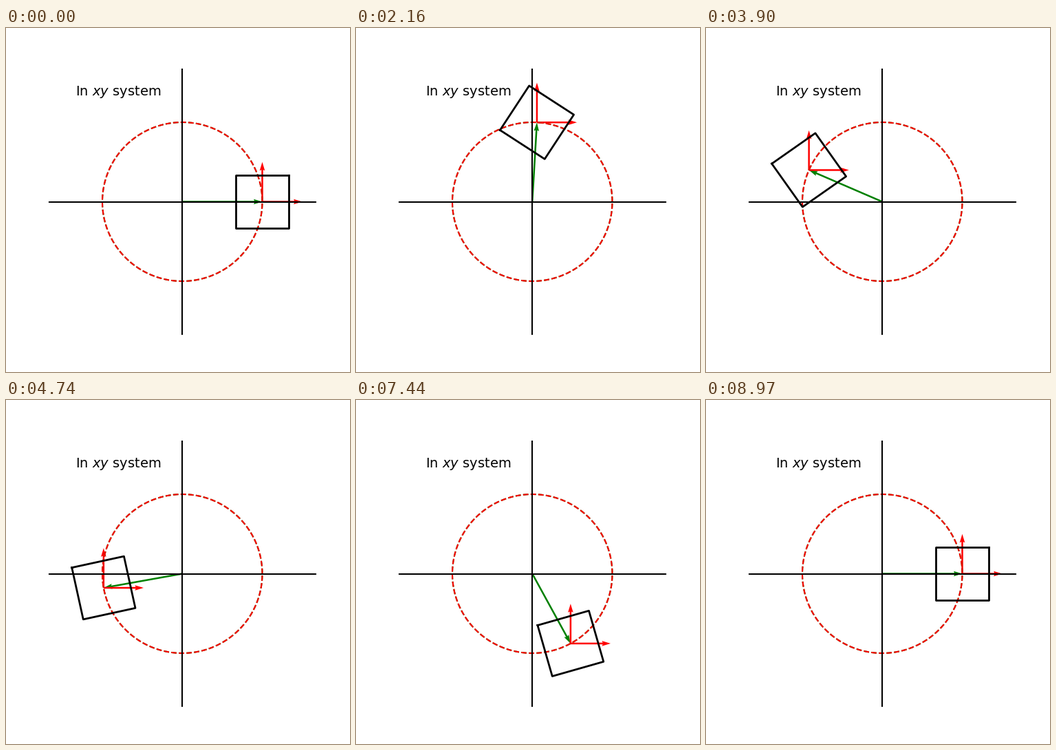
Recreate the animation shown at these times as a matplotlib script. Size 500 by 500 pixels, loop 9 s.

```python
import numpy as np
import matplotlib.pyplot as plt
from matplotlib.animation import FuncAnimation

FRAMES = 300
RADIUS = 3
SPIN = 10  # box turns per orbit
ARROW = 1.5

theta = np.linspace(0, 2 * np.pi, FRAMES)
orbit = RADIUS * np.array([np.cos(theta), np.sin(theta)])
corners = np.array([[1, -1, -1, 1, 1], [1, 1, -1, -1, 1]])

fig, ax = plt.subplots(figsize=(5, 5), dpi=100)
ax.set(xlim=(-5, 5), ylim=(-5, 5), xticks=[], yticks=[])
for side in ("right", "top"):
    ax.spines[side].set_visible(False)
for side in ("left", "bottom"):
    ax.spines[side].set_position("center")
    ax.spines[side].set_linewidth(1.5)

ax.text(-4, 4, r"In $xy$ system", fontsize=14)
for color in ("green", "red"):
    ax.plot(*orbit, "--", color=color, lw=1.5)
box, = ax.plot([], [], color="black", lw=2)


def arrow(dx, dy, color):
    return ax.quiver([0], [0], [dx], [dy], color=color, angles="xy",
                     scale_units="xy", scale=1, width=0.0065)


radius_vec = arrow(RADIUS, 0, "green")
axes_vecs = [arrow(ARROW, 0, "red"), arrow(0, ARROW, "red")]


def update(i):
    center = orbit[:, i]
    c, s = np.cos(SPIN * theta[i]), np.sin(SPIN * theta[i])
    box.set_data(*(np.array([[c, -s], [s, c]]) @ corners + center[:, None]))
    radius_vec.set_UVC(*center)
    for vec in axes_vecs:
        vec.set_offsets([center])
    return [box, radius_vec, *axes_vecs]


ani = FuncAnimation(fig, update, frames=FRAMES, interval=30, repeat=True)
plt.show()
```
